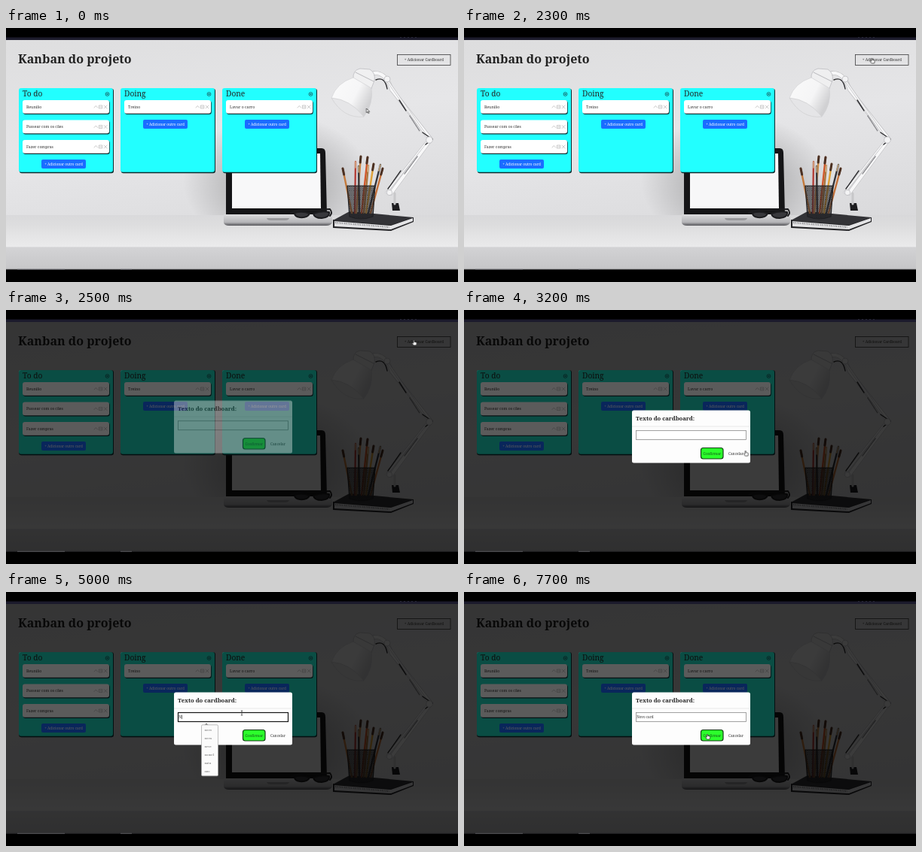
An HTML page for the animation above (8 s loop, 600x338 px).

```html
<!DOCTYPE html>
<html lang="pt">
<head>
<meta charset="utf-8">
<title>Kanban do projeto</title>
<style>
html, body { margin: 0; width: 100%; height: 100%; overflow: hidden; background: #000; }
svg { display: block; width: 600px; height: 338px; }
text { font-family: "Noto Serif", Georgia, serif; font-size: 5.15px; fill: #333; }
.bold { font-weight: 700; fill: #222; }
.mid { text-anchor: middle; }
.line { fill: none; stroke-linecap: round; stroke-linejoin: round; }

.shade, .dim, .panel, #modal, #cursor { animation: 8s linear infinite; }
.step, #field { animation: 8s step-end infinite; }
.shade { animation-name: shade; }
.dim { animation-name: dim; }
.panel { animation-name: panel; }
#modal { animation-name: modal; }
#cursor { animation-name: travel; }
#arrow { animation-name: arrow; }
#hand { animation-name: hand; }
#beam { animation-name: beam; }
#list { animation-name: list; }
#field { animation-name: focus; }
#caret { animation-name: caret; }

@keyframes shade { 0%, 28.75% { opacity: 0 } 30% { opacity: .43 } 31.25%, 100% { opacity: .76 } }
@keyframes dim { 0%, 28.75% { opacity: 0 } 30% { opacity: .36 } 31.25%, 100% { opacity: .64 } }
@keyframes panel { 0%, 28.75% { fill: #22ffff } 30% { fill: #24f0d4 } 31.25%, 100% { fill: #1cd8be } }
@keyframes modal {
  0%, 30% { opacity: 0; transform: translateY(-15px) }
  31.25% { opacity: .37; transform: translateY(-13px) }
  32.5% { opacity: 1; transform: translateY(-4px) }
  33.75%, 100% { opacity: 1; transform: none }
}
@keyframes travel {
  0%, 10% { transform: translate(478.5px, 107px) }
  21.25% { transform: translate(532px, 59px) }
  26.25%, 32.5% { transform: translate(541.5px, 40px) }
  38.75%, 40% { transform: translate(373.5px, 187px) }
  43% { transform: translate(417px, 240px) }
  46.25%, 88.75% { transform: translate(313px, 161px) }
  96.25%, 100% { transform: translate(323px, 189px) }
}
@keyframes arrow { 0%, 33%, 41%, 91.25% { opacity: 1 } 26.25%, 38%, 45%, 93.75% { opacity: 0 } }
@keyframes hand { 0%, 33%, 41% { opacity: 0 } 26.25%, 38%, 93.75%, 100% { opacity: 1 } }
@keyframes beam { 0%, 91.25%, 100% { opacity: 0 } 45% { opacity: 1 } }
@keyframes list { 0%, 63.75%, 100% { opacity: 0 } 60% { opacity: .6 } 61.25% { opacity: 1 } }
@keyframes focus { 0%, 90%, 100% { stroke: #8a8a8a; stroke-width: .8 } 46.25% { stroke: #161616; stroke-width: 1.2 } }
@keyframes caret { 0%, 52.5%, 87.5%, 100% { opacity: 0 } 46.25%, 60% { opacity: 1 } }
</style>
</head>
<body>
<svg viewBox="0 0 600 338">
  <defs>
    <linearGradient id="wall" x2=".3" y2="1">
      <stop stop-color="#dededf"/><stop offset=".5" stop-color="#e6e6e8"/><stop offset="1" stop-color="#dadadc"/>
    </linearGradient>
    <linearGradient id="desk" x2="0" y2="1">
      <stop stop-color="#d9d9db"/><stop offset=".2" stop-color="#dededf"/><stop offset=".57" stop-color="#ebebec"/>
      <stop offset=".59" stop-color="#d3d3d5"/><stop offset="1" stop-color="#c6c6c8"/>
    </linearGradient>
    <radialGradient id="shadow">
      <stop stop-color="#000" stop-opacity=".3"/><stop offset=".6" stop-color="#000" stop-opacity=".13"/>
      <stop offset="1" stop-color="#000" stop-opacity="0"/>
    </radialGradient>
    <linearGradient id="lampshade" x2="1" y2=".5">
      <stop stop-color="#fbfbfb"/><stop offset=".65" stop-color="#f6f6f7"/><stop offset="1" stop-color="#d2d2d4"/>
    </linearGradient>
    <linearGradient id="metal" x2="0" y2="1">
      <stop stop-color="#dcdcde"/><stop offset=".7" stop-color="#b4b4b7"/><stop offset="1" stop-color="#55555a"/>
    </linearGradient>
    <pattern id="mesh" width="2.4" height="2.4" patternUnits="userSpaceOnUse">
      <path d="M0 0L2.4 2.4M2.4 0L0 2.4" stroke="#1d1d20" stroke-width=".6"/>
    </pattern>
  </defs>

  <rect y="15" width="600" height="307" fill="url(#wall)"/>
  <ellipse cx="360" cy="205" rx="125" ry="90" fill="url(#shadow)"/>
  <rect y="249" width="600" height="73" fill="url(#desk)"/>

  <!-- laptop -->
  <path d="M292 248V166Q292 160 298 160H419Q424 160 424 166L426 248Z" fill="#151517"/>
  <path d="M300 167H417L418 240H300Z" fill="#f8f8f9"/>
  <path d="M289 248H433V259Q431 263 425 263H296Q290 263 289 259Z" fill="url(#metal)"/>
  <path d="M346 253h30q-1 3-5 3h-20q-4 0-5-3Z" fill="#99999c"/>

  <!-- glasses -->
  <g class="line" stroke="#1c1c1f" stroke-width="2">
    <path d="M378 246Q390 240 407 242L430 241Q434 246 430 250"/>
    <path d="M383 246Q394 243 403 247Q400 253 390 252Q383 251 383 246ZM408 247Q418 243 429 245Q430 252 419 253Q409 253 408 247Z" fill="#38383c"/>
  </g>

  <!-- lamp -->
  <path d="M512 233H521L523 243H513Z" fill="#1d1d20"/>
  <g class="line">
    <path d="M488 60Q504 58 512 82L564 148L511 220" stroke="#bcbcbf" stroke-width="5.4"/>
    <path d="M488 60Q504 58 512 82L564 148L511 220" stroke="#f8f8f9" stroke-width="4.2"/>
    <path d="M505 68L558 144M557 153L505 219" stroke="#b5b5b8" stroke-width="2.8"/>
    <path d="M505 68L558 144M557 153L505 219" stroke="#f5f5f6" stroke-width="1.9"/>
    <path d="M491 69Q503 64 506 81M522 96L531 110M553 139L566 148L557 155M524 190L507 214" stroke="#2d2d30" stroke-width="1.4"/>
    <path d="M536 117L549 137M546 171L529 194" stroke="#88888c" stroke-width="1.5" stroke-dasharray=".6 1.3"/>
    <path d="M516 220V234" stroke="#c8c8ca" stroke-width="3"/>
  </g>
  <g fill="#f4f4f5" stroke="#b7b7ba" stroke-width=".7">
    <circle cx="506" cy="68" r="4"/><circle cx="562" cy="149" r="4.3"/><circle cx="509" cy="219" r="3.6"/>
    <path d="M461 68Q460 56 470 54L483 55Q491 60 489 70L484 83Z" fill="#f0f0f1"/>
    <path d="M464 59L488 71" class="line" stroke="#a1a1a5"/>
    <path d="M432 93Q439 73 461 66L485 80Q488 101 475 118Q450 116 432 93Z" fill="url(#lampshade)" stroke="#d2d2d4"/>
    <path d="M432 93Q457 95 475 118Q448 121 432 93Z" fill="#e6e6e8" stroke="#d0d0d2"/>
  </g>

  <!-- notebook -->
  <path d="M434 255L541 252V258L511 270L434 266Z" fill="#232326"/>
  <path d="M436 257L511 263L540 253V257L511 268L436 264Z" fill="#e4e4e6"/>
  <path d="M434 256L456 244L541 252L511 262Z" fill="#333337"/>
  <path d="M437 259L509 265" stroke="#5c5c60" stroke-width="2.4" stroke-dasharray=".7 1.7"/>

  <g id="pencils" class="line"></g>
  <path d="M453 210H490L487 251Q471 257 456 251Z" fill="#242428" fill-opacity=".28"/>
  <path d="M453 210H490L487 251Q471 257 456 251Z" fill="url(#mesh)" stroke="#202023" stroke-width="1.2"/>

  <text class="bold" x="16" y="46.5" style="font-size:16px">Kanban do projeto</text>
  <rect x="519.5" y="35.5" width="70.5" height="14" fill="none" stroke="#3c3c3e" stroke-width=".8"/>
  <text class="mid" x="554.8" y="44.2" style="font-size:4.8px">+ Adicionar Cardboard</text>
  <rect class="shade" y="15" width="600" height="307"/>

  <g id="boards"></g>

  <!-- screen edges -->
  <rect width="600" height="12.5"/>
  <rect y="12.5" width="600" height="3.5" fill="#1c1b2c"/>
  <path d="M523 12.5H546" stroke="#43435a" stroke-width=".5" stroke-dasharray="2 3"/>
  <rect y="321.5" width="600" height="16.5"/>
  <path d="M0 321.3H600" stroke="#242426" stroke-width=".8"/>
  <path d="M15 321.3H78M152 321.3H167" stroke="#68686c" stroke-width=".8"/>

  <g id="modal">
    <rect x="223" y="133.5" width="157" height="70" rx="2.5" fill="#fdfdfd"/>
    <text class="bold" x="228" y="146.6" style="font-size:7.6px">Texto do cardboard:</text>
    <path d="M223 155H380" stroke="#dedede" stroke-width=".7"/>
    <rect id="field" x="228.5" y="160.5" width="146" height="12" fill="#fff"/>
    <text id="typed" x="229.2" y="168.2" style="font-size:4.6px;white-space:pre"></text>
    <rect id="caret" class="step" y="163.5" width=".7" height="5.6" fill="#222"/>
    <rect x="314.5" y="183.5" width="29.5" height="14.5" rx="3" fill="#2bff2b" stroke="#123d14" stroke-width="1.2"/>
    <text class="mid" x="329.3" y="192.6" style="font-size:4.8px;fill:#14541a">Confirmar</text>
    <text class="mid" x="361" y="192.6" style="font-size:4.75px">Cancelar</text>
    <g id="list" class="step">
      <path d="M263.5 177L266 174.5L268.5 177Z" fill="#777"/>
      <rect x="259.5" y="176.8" width="22" height="68" rx="1.5" fill="#fbfbfb" stroke="#a5a5a5" stroke-width=".7"/>
    </g>
  </g>

  <g id="cursor" stroke="#222" stroke-width=".7" stroke-linejoin="round">
    <path id="arrow" class="step" d="M0 0V5.7L1.4 4.5L2.4 6.7L3.3 6.3L2.4 4.2H4.2Z" fill="#fff"/>
    <path id="hand" class="step" d="M-.7 .6Q0-.5 .7 .6V2.5L3 3Q3.8 3.3 3.7 4.2L3.1 7H-.5L-2.4 4.3Q-2.2 3.3-.7 4.3Z" fill="#fff"/>
    <path id="beam" class="step" d="M-1.2-3H1.2M0-3V3M-1.2 3H1.2" fill="none" stroke="#333"/>
  </g>
</svg>
<script>
const $ = id => document.getElementById(id);

const boards = [
  ["To do", ["Reunião", "Passear com os cães", "Fazer compras"]],
  ["Doing", ["Treino"]],
  ["Done", ["Lavar o carro"]],
];

const card = (label, i) => `<g transform="translate(5 ${16 + i * 26.5})">
  <rect x=".8" y="1" width="115" height="18" rx="3" fill="#123236"/>
  <rect width="115" height="17.8" rx="3" fill="#fff"/>
  <text x="5" y="10.9">${label}</text>
  <path d="M95 10L97.3 7.5L99.6 10M101.8 7H105.8V11H101.8ZM102.8 9H104.8M108.2 7L112 11M112 7L108.2 11"
    class="line" stroke="#aaa" stroke-width=".6"/></g>`;

const board = ([title, cards], i) => {
  const y = 15.5 + cards.length * 26.5;
  return `<g transform="translate(${17 + i * 135} 80)">
    <rect x=".8" y=".8" width="125.2" height="112.4" rx="3" fill="#0d2b2e"/>
    <rect class="panel" width="125" height="111.8" rx="3"/>
    <text x="5" y="11.4" style="font-size:10.2px;fill:#222">${title}</text>
    <circle cx="117.5" cy="8" r="2.4" fill="none" stroke="#174e52" stroke-width=".8"/>
    <circle cx="117.5" cy="8" r=".9" fill="#174e52"/>
    ${cards.map(card).join("")}
    <rect x="30" y="${y}" width="59" height="12" rx="2" fill="#1a6cff"/>
    <text class="mid" x="59.5" y="${y + 7.6}" style="font-size:4.7px;fill:#fff">+ Adicionar outro card</text>
    <rect class="dim" width="126" height="113.2" rx="3"/></g>`;
};
$("boards").innerHTML = boards.map(board).join("");

// Foot x, tip x, tip y and colour; every second one is a brush.
const pencils = [
  [459, 447, 187, "#c47a3c"], [463, 464, 178, "#b5413a"], [465, 471, 171, "#d08a48"],
  [469, 468, 184, "#3b3b40"], [472, 480, 172, "#d2582c"], [475, 481, 183, "#a9763f"],
  [478, 488, 181, "#e0a23a"], [481, 497, 182, "#34343a"], [484, 500, 187, "#c2703a"],
];
$("pencils").innerHTML = pencils.map(([foot, x, y, color], i) => {
  const dx = (foot - x) * .14;
  const tip = i % 2 ? ["#d9b98c", 1.4] : ["#4a3023", 3];
  return `<path d="M${foot} 246L${x} ${y}" stroke="${color}" stroke-width="2.4"/>
    <path d="M${x + dx} ${y + 8}L${x} ${y}" stroke="${tip[0]}" stroke-width="${tip[1]}"/>`;
}).join("");

$("list").innerHTML += ["novo", "nova", "neve", "nome1", "natu", "ano"].map((word, i) =>
  `<text x="263.5" y="${185.3 + i * 11}" style="font-size:4px;fill:#666">${word}</text>`).join("");

const message = "Novo card";
const keyTimes = [4800, 5300, 5400, 5500, 5800, 6000, 6100, 6200, 6400];
const typed = $("typed"), caret = $("caret");
let start, shown = -1;

function tick(now) {
  start ??= now;
  const time = (now - start) % 8000;
  const count = keyTimes.filter(key => key <= time).length;
  if (count !== shown) {
    shown = count;
    typed.textContent = message.slice(0, count);
    caret.setAttribute("x", 229.4 + (count ? typed.getComputedTextLength() : 0));
  }
  requestAnimationFrame(tick);
}
requestAnimationFrame(tick);
</script>
</body>
</html>
```
